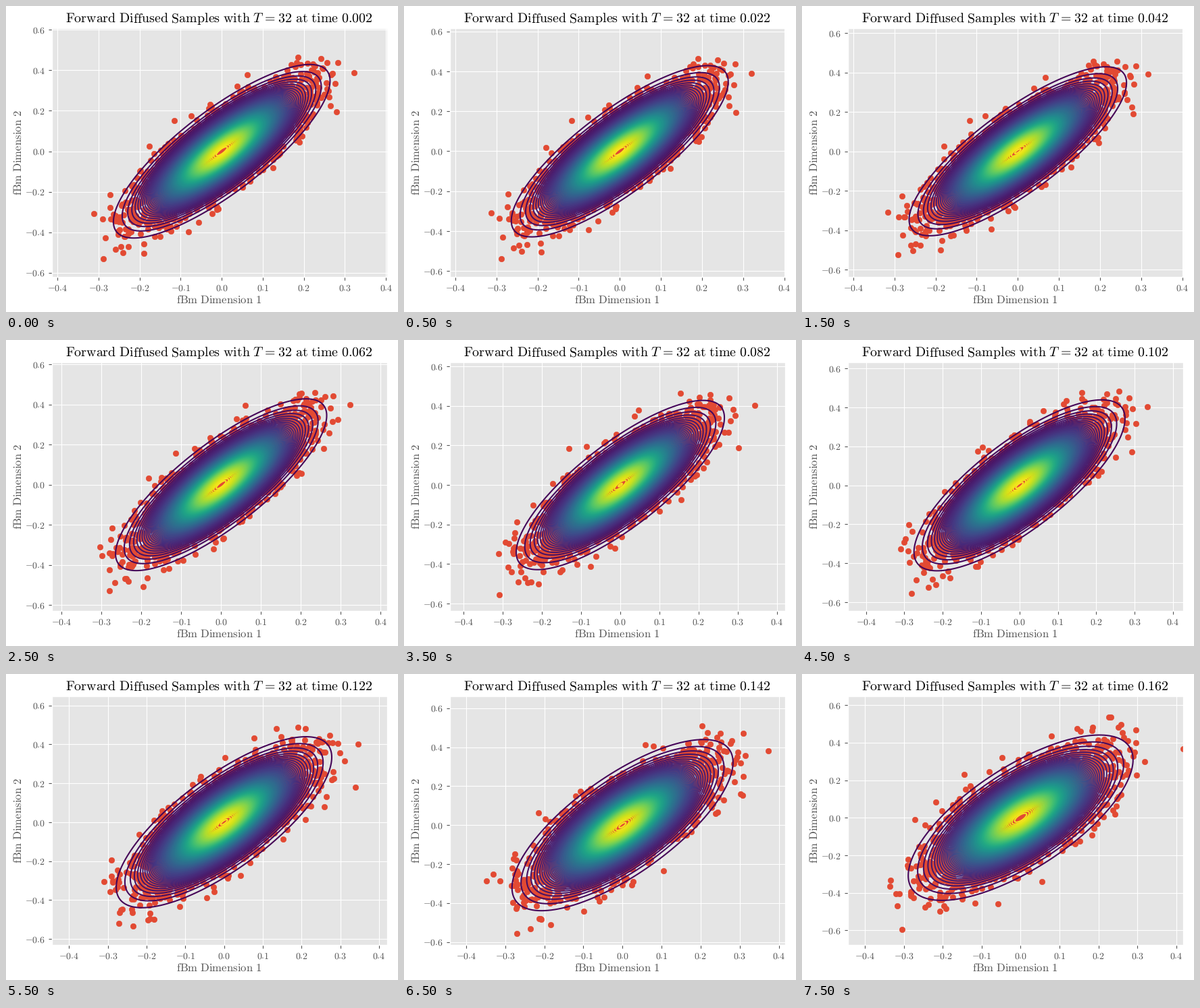
A matplotlib script for the animation above (8000 ms loop, 580 by 454 pixels).

```python
import numpy as np
import matplotlib.pyplot as plt
from matplotlib.animation import FuncAnimation
from matplotlib.collections import LineCollection

plt.style.use("ggplot")
plt.rcParams.update({
    "font.family": "Liberation Serif",
    "mathtext.fontset": "cm",
    "text.hinting": "none",
})

W, H, DPI = 580, 454, 100
LEFT, RIGHT, TOP, BOTTOM = 68.0, 564.0, 32.6, 402.2
CENTER = 315.4
RED, GREY = "#E24A33", "#555555"

# Covariance of two steps of fractional Brownian motion
HURST, STEPS = 0.7, 32
VAR = STEPS ** (-2 * HURST)
COV = VAR * 2 ** (2 * HURST) / 2
BASE = np.array([[VAR, COV], [COV, 2 * COV]])
SAMPLES = np.random.default_rng(11).multivariate_normal((0, 0), BASE, 5000)

# Key steps of the drifting view: origin and scale in pixels
KEYS = [0, 2, 3, 5, 7, 8]
ORIGIN_X = [319.2, 319.3, 318.3, 321.8, 323.3, 323.5]
ORIGIN_Y = [215.5, 215.5, 214.7, 215.6, 224.2, 213.2]
SCALE_X = [607.5, 609, 590, 568, 578.4, 576]
SCALE_Y = [300.4, 292.5, 297.5, 289, 289, 278.5]

ANGLE = np.linspace(0, 2 * np.pi, 181)
CIRCLE = np.array([np.cos(ANGLE), np.sin(ANGLE)])


def noise_var(t):
    return 0.43 * t ** 3


def diffuse(step, t):
    rng = np.random.default_rng(100 + step)
    v = noise_var(t)
    return np.sqrt(1 - v) * SAMPLES + np.sqrt(v) * rng.normal(size=SAMPLES.shape)


def density_rings(t):
    """Level curves of the Gaussian density and their colours."""
    v = noise_var(t)
    cov = (1 - v) * BASE + v * np.eye(2)
    peak = 1 / (2 * np.pi * np.sqrt(np.linalg.det(cov)))
    gap = 0.25 if t < 0.09 else 0.2
    levels = np.arange(gap, peak, gap)
    radii = np.sqrt(2 * np.log(peak / levels))
    unit = (np.linalg.cholesky(cov) @ CIRCLE).T
    top = np.ceil(peak / gap) * gap
    return [r * unit for r in radii], plt.cm.viridis(levels / top)


def set_view(step):
    ox, oy, sx, sy = (np.interp(step, KEYS, values)
                      for values in (ORIGIN_X, ORIGIN_Y, SCALE_X, SCALE_Y))
    ax.set_xlim((LEFT - ox) / sx, (RIGHT - ox) / sx)
    ax.set_ylim((oy - BOTTOM) / sy, (oy - TOP) / sy)


def roman(text):
    return r"\mathrm{" + text.replace(" ", r"\ ") + "}"


def title_text(t):
    equation = r"T\hspace{0.08}=\hspace{0.08}32"
    return ("$" + roman("Forward Diffused Samples with ") + equation
            + roman(f" at time {t:.3f}") + "$")


def tick_labels(values):
    return [f"${v:.1f}$" for v in values]


fig = plt.figure(figsize=(W / DPI, H / DPI), dpi=DPI, facecolor="white")
ax = fig.add_axes([LEFT / W, 1 - BOTTOM / H, (RIGHT - LEFT) / W, (BOTTOM - TOP) / H])
ax.set_autoscale_on(False)

xticks, yticks = np.arange(-4, 5) / 10, np.arange(-6, 7, 2) / 10
ax.set_xticks(xticks, tick_labels(xticks))
ax.set_yticks(yticks, tick_labels(yticks))

label = dict(fontsize=12, color=GREY, ha="center", va="baseline", rotation_mode="anchor")
fig.text(CENTER / W, 1 - 441.2 / H, f"${roman('fBm Dimension 1')}$", **label)
fig.text(22.4 / W, 1 - 217.3 / H, f"${roman('fBm Dimension 2')}$", rotation=90, **label)

title = ax.set_title("", x=(CENTER - LEFT) / (RIGHT - LEFT), fontsize=14.32)
dots = ax.scatter([], [], s=36, color=RED, linewidths=0.5, zorder=1)
rings = ax.add_collection(LineCollection([], linewidths=1.5, zorder=2), autolim=False)


def update(frame):
    step = (frame + 1) // 2
    t = 0.002 + 0.02 * step
    set_view(step)
    title.set_text(title_text(t))
    dots.set_offsets(diffuse(step, t))
    curves, colors = density_rings(t)
    rings.set_segments(curves)
    rings.set_color(colors)
    return title, dots, rings


anim = FuncAnimation(fig, update, frames=16, interval=500, repeat=True,
                     repeat_delay=0, blit=False)
plt.show()
```
